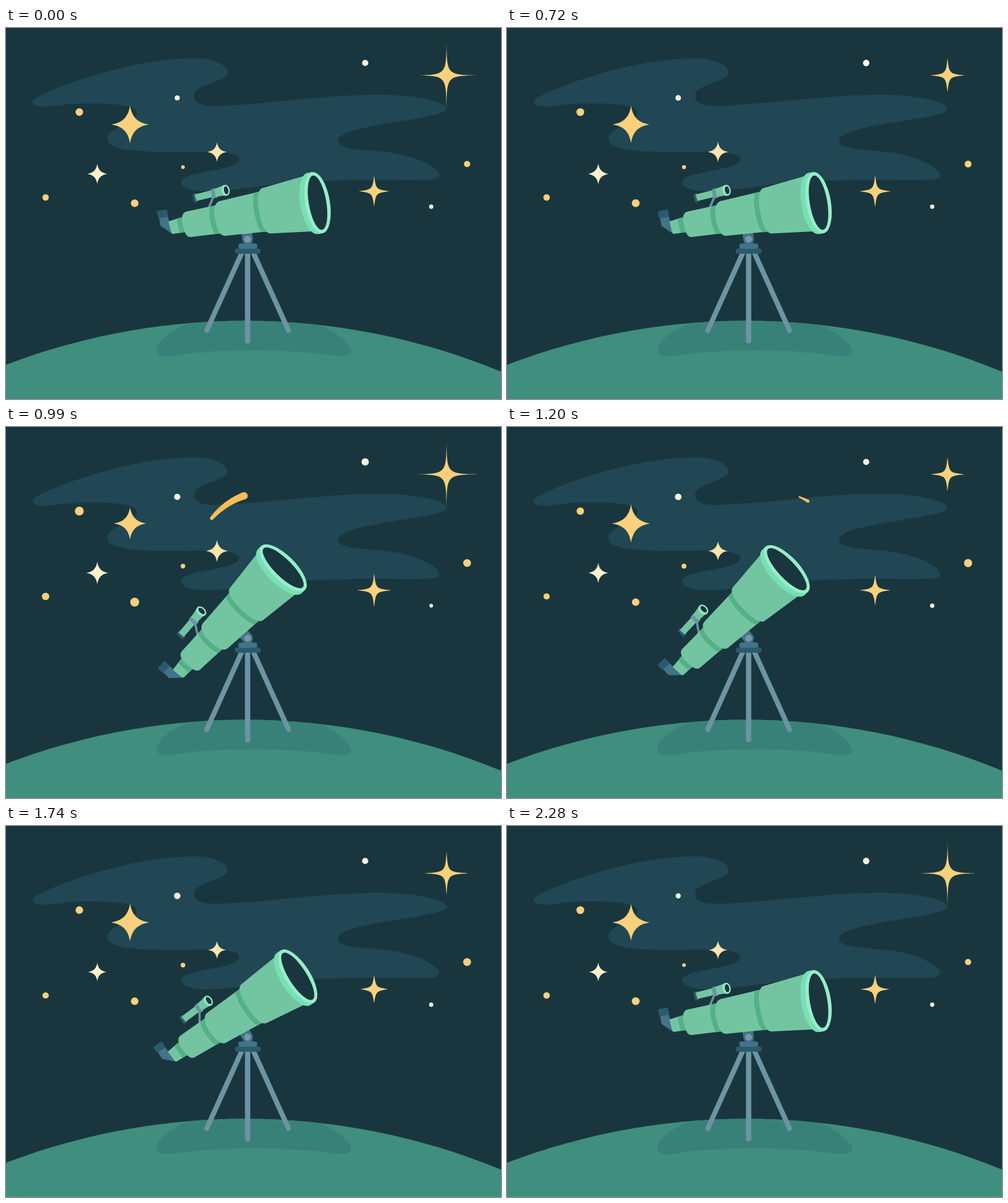
Animation of 800x600 px, one loop 2.31 s. Source, as an HTML page with a canvas:

```html
<!DOCTYPE html>
<html lang="en">
<head>
<meta charset="utf-8">
<title>Telescope</title>
<style>
  html, body { margin: 0; width: 100%; height: 100%; overflow: hidden; background: #19363e; }
  canvas { display: block; }
</style>
</head>
<body>
<canvas id="stage" width="800" height="600"></canvas>
<script>
const ctx = document.getElementById('stage').getContext('2d');
const LOOP = 2310, STEP = 30;
const PIVOT = [390.5, 341.5];
const YELLOW = '#fad07c', CREAM = '#fff0cc', PALE = '#fde3ae', WHITE = '#fff6e3';
const GREEN = '#73c5a2', DARK_GREEN = '#54b186', RIM = '#98ecc9', RIM_SIDE = '#78dfb6';
const NIGHT = '#19363e', STEEL = '#6c94a3', MOUNT = '#43728a', NAVY = '#2b5a6d';

const cloud = new Path2D(`M43 119 C43 108 190 49 305 49 C335 49 358 60 358 71
  C358 88 304 90 304 110 C304 121 316 127 345 126 C420 123 520 108 600 108
  C660 108 712 118 712 131 C712 148 537 155 537 182 C537 198 575 195 625 202
  C665 208 700 226 700 238 C700 246 685 246 645 246 C540 245 480 247 430 253
  C390 259 350 264 325 264 C300 264 283 258 283 250 C283 230 377 232 377 212
  C377 200 345 200 300 200 C200 202 164 196 164 179 C164 160 211 155 211 137
  C211 125 180 122 130 122 C95 122 82 127 60 127 C48 127 43 124 43 119Z`);
const shadow = new Path2D(`M300 470 L300 478 C272 482 243 508 243 521 C243 534 265 532 290 527
  C350 519.500 450 519.500 510 527 C540 532 558 533 558 522 C558 510 520 480 495 478 L495 470Z`);
const hill = new Path2D();
hill.arc(386, 1555.5, 1082, 0, Math.PI * 2);

// Tube sections from the eyepiece to the front
const barrels = [
  'M265 312 Q262 312 263 315 L267 331 Q268 333 270 333 L290 330 L284 306Z',
  'M291 297 C284 299 283 309 286 319 C288 329 291 339 299 338 L348 332 L342 286Z',
  'M345 280 C336 283 335 298 338 310 C341 324 345 337 355 336 L424 329 L412 264Z',
  'M414 259 C406 262 406 279 409 296 C412 313 418 333 428 332.300 L500 328.700 L488 237.500Z'
].map(d => new Path2D(d));

// Twinkling: pulses per loop, place of the peak within a pulse, relative strength
const rhythm = (beats, peak, strength) =>
  t => 1 + strength * Math.cos(2 * Math.PI * (beats * t / LOOP - peak));
const slow = rhythm(1, 0.6, 0.16);
const steady = rhythm(4, 0.6, 0.1);
const counter = rhythm(4, 0.1, 0.1);
const quick = rhythm(5, 0.3, 0.13);
const flare = rhythm(5, 0.08, 0.33);

const light = (x, y, size, color, pulse, shape) => ({ x, y, size, color, pulse, shape });
const lights = [
  light(118.5, 136, 6.7, YELLOW, steady, drawDot),
  light(208, 283.3, 6.7, YELLOW, steady, drawDot),
  light(580.5, 56.5, 5.5, WHITE, steady, drawDot),
  light(64, 274, 5.6, YELLOW, steady, drawDot),
  light(687.2, 289, 3.2, WHITE, counter, drawDot),
  light(745.2, 220, 5.8, YELLOW, slow, drawDot),
  light(286, 225, 3.4, YELLOW, slow, drawDot),
  light(276.7, 113, 4.7, WHITE, slow, drawDot),
  light(712, 76.5, 41, YELLOW, flare, drawSlimStar),
  light(595, 264, 26, YELLOW, quick, drawSlimStar),
  light(200.5, 156, 28.3, YELLOW, counter, drawFullStar),
  light(147.5, 236, 16.8, CREAM, quick, drawFullStar),
  light(341, 200.5, 16.5, PALE, quick, drawFullStar)
];

// Telescope tilt in degrees: swing up with overshoot, rest, swing back
const TILT = [[0, 0], [720, 0], [1020, -36.5], [1380, -30.4], [1650, -30.4],
              [1940, 3.5], [2150, 0], [LOOP, 0]];

const ease = u => (1 - Math.cos(Math.PI * u)) / 2;
const mix = (a, b, u) => a + (b - a) * u;
const rad = deg => deg * Math.PI / 180;

function tiltAt(t) {
  const i = TILT.findIndex(key => t < key[0]);
  const [t0, a] = TILT[i - 1], [t1, b] = TILT[i];
  return mix(a, b, ease((t - t0) / (t1 - t0)));
}

function fill(path, color) {
  ctx.fillStyle = color;
  ctx.fill(path);
}

function ellipse(x, y, rx, ry, color, angle = 0) {
  ctx.fillStyle = color;
  ctx.beginPath();
  ctx.ellipse(x, y, rx, ry, rad(angle), 0, Math.PI * 2);
  ctx.fill();
}

function line(x1, y1, x2, y2, width, color, cap = 'round') {
  ctx.strokeStyle = color;
  ctx.lineWidth = width;
  ctx.lineCap = cap;
  ctx.beginPath();
  ctx.moveTo(x1, y1);
  ctx.lineTo(x2, y2);
  ctx.stroke();
}

function polygon(points, color, round = 0) {
  ctx.beginPath();
  points.forEach(([x, y]) => ctx.lineTo(x, y));
  ctx.closePath();
  ctx.fillStyle = ctx.strokeStyle = color;
  ctx.fill();
  if (round) {
    ctx.lineWidth = round * 2;
    ctx.lineJoin = 'round';
    ctx.stroke();
  }
}

function plate(x, y, w, h, r, color) {
  ctx.fillStyle = color;
  ctx.beginPath();
  ctx.roundRect(x, y, w, h, r);
  ctx.fill();
}

function drawDot(x, y, r, color) {
  ellipse(x, y, r, r, color);
}

// Four tips at distance h; near and far place the curve handles between them
function drawStar(x, y, h, color, near, far) {
  ctx.save();
  ctx.translate(x, y);
  ctx.fillStyle = color;
  ctx.beginPath();
  ctx.moveTo(0, -h);
  for (let i = 0; i < 4; i++) {
    ctx.bezierCurveTo(near, -far, far, -near, h, 0);
    ctx.rotate(Math.PI / 2);
  }
  ctx.fill();
  ctx.restore();
}

function drawSlimStar(x, y, h, color) {
  const waist = 5 - 0.08 * h;
  drawStar(x, y, h, color, waist, waist);
}

function drawFullStar(x, y, h, color) {
  drawStar(x, y, h, color, 0.1 * h, 0.39 * h);
}

function drawComet(t) {
  const angle = time => Math.min(-60, mix(-140, -109, Math.max(0, (time - 900) / 90)));
  const head = angle(t), tail = angle(t - 90);
  const span = head - tail;
  if (span <= 0) return;
  const scale = Math.min(1, span / 20);
  for (let u = 0; u <= 1; u += 0.025) {
    const a = rad(mix(tail, head, u));
    drawDot(426 + 122 * Math.cos(a), 226 + 122 * Math.sin(a), mix(2.8, 6, u) * scale, '#f8bd59');
  }
}

function drawTripod() {
  line(381, 364, 324.5, 489, 8, STEEL);
  line(400, 364, 456.5, 489, 8, STEEL);
  line(390.5, 362, 390.5, 506, 8.5, STEEL);
  plate(370, 356.5, 41.5, 8.5, 3.5, NAVY);
  polygon([[382, 350], [386, 344], [396, 344], [400, 350]], NAVY);
  plate(375.5, 348.5, 30.5, 8.5, 3.5, MOUNT);
}

function drawFinder() {
  line(336, 271, 328, 290, 3.5, STEEL, 'butt');
  polygon([[303.5, 270], [306.5, 269], [309, 279], [305.5, 280]], NAVY, 2);
  polygon([[306, 270], [336, 262.5], [338, 271.5], [308.5, 278.5]], GREEN, 1);
  polygon([[333, 262.5], [337.5, 261.5], [340, 272.5], [335, 273.5]], STEEL, 2);
  polygon([[337.5, 261], [352, 255.5], [355, 269.5], [340, 272]], GREEN, 1);
  ellipse(353.8, 262.7, 6, 8.9, RIM_SIDE, -11);
  ellipse(355.5, 262.4, 6, 8.9, RIM, -11);
  ellipse(355.7, 262.4, 3.6, 6.5, NIGHT, -11);
}

function drawLens() {
  const disc = (back, rx, ry, color) =>
    ellipse(503.5 - back, 282.5 + back * 0.17, rx, ry, color, -9.5);
  for (let back = 8; back > 0; back--) disc(back, 20, 50, RIM_SIDE);
  disc(0, 20, 50, RIM);
  disc(0, 14.2, 44.6, NIGHT);
}

function drawTelescope(t) {
  ctx.save();
  ctx.translate(...PIVOT);
  ctx.rotate(rad(tiltAt(t)));
  ctx.translate(-PIVOT[0], -PIVOT[1]);

  line(388.5, 328, ...PIVOT, 17, MOUNT);
  drawDot(...PIVOT, 5.6, '#7398a7');

  polygon([[247, 305], [261, 303], [264, 314], [267.5, 332], [249.5, 320]], MOUNT);
  polygon([[246, 298], [258.5, 295.5], [260, 303.5], [247.5, 305.5]], NAVY, 2);
  drawFinder();

  // Each section carries a dark band along the edge of the next one
  barrels.forEach((barrel, i) => {
    fill(barrel, GREEN);
    if (i === barrels.length - 1) return;
    ctx.save();
    ctx.clip(barrel);
    ctx.translate(-8, 1.3);
    fill(barrels[i + 1], DARK_GREEN);
    ctx.restore();
  });
  drawLens();
  ctx.restore();
}

function draw(t) {
  ctx.fillStyle = NIGHT;
  ctx.fillRect(0, 0, 800, 600);
  fill(cloud, '#204753');
  for (const { x, y, size, color, pulse, shape } of lights) shape(x, y, size * pulse(t), color);
  drawComet(t);

  fill(hill, '#408e7e');
  ctx.save();
  ctx.clip(hill);
  fill(shadow, '#388179');
  ctx.restore();

  drawTripod();
  drawTelescope(t);
}

const start = performance.now();
function tick() {
  const elapsed = (performance.now() - start) % LOOP;
  draw(Math.floor(elapsed / STEP) * STEP);
  requestAnimationFrame(tick);
}
tick();
</script>
</body>
</html>
```
